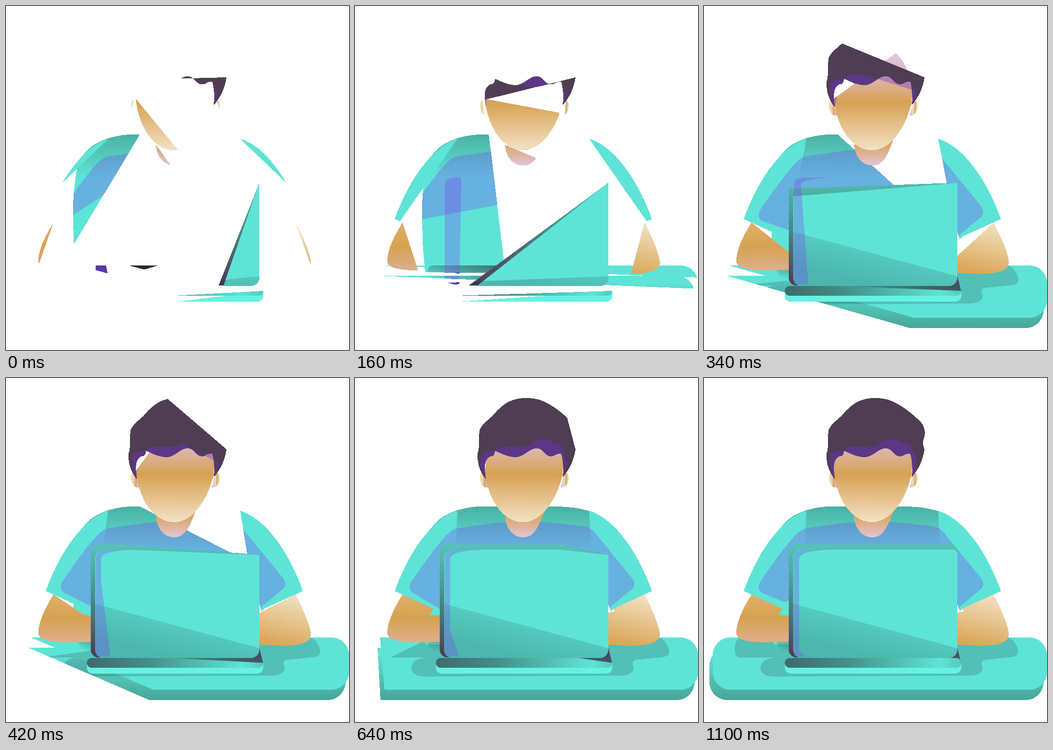
These frames come from a looping animation (700 px wide and 704 px high, 1600 ms). An HTML page with a canvas:

```html
<!DOCTYPE html>
<html>
<head>
<meta charset="utf-8">
<style>
html, body { margin: 0; width: 100%; height: 100%; overflow: hidden; background: #fff; }
canvas { display: block; }
</style>
</head>
<body>
<canvas id="stage" width="700" height="704"></canvas>
<script>
const W = 700, H = 704, LOOP = 1600, DONE = 1100, STEP = 20;
const ctx = document.getElementById('stage').getContext('2d', { willReadFrequently: true });

const TEAL = '#5ee4d6';
const VIOLET = 'rgba(117,82,238,.35)';
const FRINGE = 'rgba(112,46,212,.38)';

// Linear gradient from (x0,y0) to (x1,y1); stops alternate offset and colour
function grad(x0, y0, x1, y1, ...stops) {
  const g = ctx.createLinearGradient(x0, y0, x1, y1);
  for (let i = 0; i < stops.length; i += 2) g.addColorStop(stops[i], stops[i + 1]);
  return g;
}

// Reflects a path so that x becomes sum - x
const mirror = (d, sum) => d.replace(/(\d+) (\d+)/g, (m, x, y) => `${sum - x} ${y}`);

// Samples a path into evenly spaced points
function shape(d, fill) {
  const el = document.createElementNS('http://www.w3.org/2000/svg', 'path');
  el.setAttribute('d', d);
  const len = el.getTotalLength(), n = Math.ceil(len / 1.5), pts = [];
  for (let i = 0; i <= n; i++) pts.push(el.getPointAtLength(len * i / n));
  return { pts, fill };
}

const sleeve = 'M209 272 C180 280 148 308 118 357 C103 382 90 411 81 436 L160 472 L165 478 L205 345 Z';
const ear = 'M261 193 C256 195 254 200 255 208 C257 216 260 222 266 224 L271 224 C268 212 266 202 265 193 Z';

const shapes = [
  // table
  shape('M46 552 L656 552 A37 37 0 0 1 693 589 L693 622 A37 37 0 0 1 656 659 L48 659 A37 37 0 0 1 11 622 L11 589 A37 37 0 0 1 46 552',
    grad(0, 565, 0, 659, 0, TEAL, 1, '#47a598')),
  shape('M51 531 L664 531 A36 36 0 0 1 700 567 L700 602 A36 36 0 0 1 664 638 L54 638 A36 36 0 0 1 18 602 L18 567 A36 36 0 0 1 51 531', TEAL),
  shape('M72 572 L148 572 C125 573 115 583 115 593 C116 606 127 611 145 611 L545 609 C562 608 571 600 568 590 C563 580 570 576 582 576 L620 572 C640 571 644 565 640 554 C636 541 630 533 617 531 L73 531 C63 538 63 549 63 556 C63 566 66 571 72 572',
    'rgba(40,40,60,.2)'),

  // torso and laptop base
  shape('M273 263 C245 262 222 266 205 272 C180 281 160 295 149 320 C139 350 137 400 137 430 L138 486 L143 545 L517 548 L515 465 L490 290 L480 273 C455 265 430 263 400 263 Z',
    grad(0, 263, 0, 350, 0, '#4bb0a4', 1, TEAL)),
  shape('M170 575 L163 572 L148 541 Q150 531 160 531 L512 531 L525 585 L180 583 Z',
    grad(165, 560, 191, 463, 0, 'rgba(0,0,0,0)', 1, '#54405c')),

  // arms
  shape('M97 443 C80 470 66 500 66 522 C66 536 90 541 130 541 L173 540 L173 486 L152 485 L160 472 Z',
    grad(0, 443, 0, 541, 0, '#dfb06a', .5, '#d7a152', 1, '#dcb08c')),
  shape('M591 443 C605 470 622 508 622 525 C622 543 595 548 562 548 L517 546 L517 480 L531 477 L526 472 Z',
    grad(590, 443, 565, 548, 0, '#f2e2c3', 1, '#daa758')),
  shape(sleeve, TEAL),
  shape(mirror(sleeve, 687), TEAL),
  shape('M119 440 C111 436 110 426 114 418 C140 380 165 345 186 322 C195 313 203 308 212 307 L290 296 C325 293 365 293 400 296 L465 303 C476 304 483 309 490 317 L565 409 C572 418 571 428 564 433 L522 468 L470 555 L230 555 L180 445 Q173 460 160 457 Z', VIOLET),

  // head
  shape('M306 284 C308 305 320 326 343 326 C366 326 372 305 380 290 L386 275 Z',
    grad(0, 284, 0, 326, 0, '#d9a765', 1, '#e3c3d6')),
  shape(ear, grad(255, 0, 271, 0, 0, '#f1dfbe', .35, '#ecd3a6', .65, '#d9a04f', .85, '#dcc4ee', 1, '#b98af0')),
  shape(mirror(ear, 691), grad(436, 0, 420, 0, 0, '#f1dfbe', .35, '#d9a862', .55, '#f0dcb8', .85, '#dcc4ee', 1, '#b98af0')),
  shape('M265 190 C270 245 300 295 343 295 C385 295 415 240 424 195 C428 150 410 112 390 95 C355 74 290 78 275 127 C266 150 265 170 265 190',
    grad(0, 95, 0, 295, 0, '#dfc8ec', .27, '#dcb5a8', .51, '#d7a152', 1, '#f3e2c6')),
  shape('M450 146 C447 168 437 188 424 203 C426 185 425 170 421 155 C408 154 408 162 397 160 C386 157 384 145 372 144 C355 143 345 163 325 162 C308 160 300 155 286 149 C284 155 285 160 277 160 C267 164 264 176 265 190 L267 207 C256 194 249 175 250 155 C255 140 252 125 254 108 C258 95 270 88 281 77 C305 48 325 41 350 41 C358 41 366 42 374 44 C395 50 415 65 435 83 C450 95 452 108 450 120 C446 130 446 136 450 146',
    '#4f3d54'),
  shape('M433 174 C431 185 428 194 424 201 C426 185 425 170 421 155 C408 154 408 162 397 160 C386 157 384 145 372 144 C355 143 345 163 325 162 C308 160 300 155 286 149 C290 141 303 139 318 140 C335 143 350 142 362 132 C375 123 390 122 405 133 C415 133 422 133 424 146 C430 155 433 165 433 174',
    FRINGE),
  shape('M267 207 C258 195 255 170 258 160 C262 150 272 148 286 149 C284 155 285 160 277 160 C267 164 264 176 265 190 Z', FRINGE),

  // laptop lid
  shape('M517 362 L517 556 A16 16 0 0 1 501 572 L189 572 A16 16 0 0 1 173 556 L173 357 A16 16 0 0 1 189 341 L503 341 A14 14 0 0 1 517 355 Z',
    grad(0, 341, 0, 572, 0, '#55c4b6', .45, '#47908a', 1, '#4d3a55')),
  shape('M517 362 L517 556 A17 17 0 0 1 500 573 L199 573 A17 17 0 0 1 182 556 L182 368 A17 17 0 0 1 199 351 L507 351 A10 10 0 0 1 517 362', TEAL),
  shape('M517 553 L517 556 A17 17 0 0 1 500 573 L199 573 A17 17 0 0 1 182 556 L182 462 Z',
    grad(365, 490, 345, 573, 0, 'rgba(20,30,40,.1)', 1, 'rgba(20,30,40,.23)')),
  shape('M213 570 L183 570 L183 370 C183 357 190 351 203 351 L277 351 C250 351 225 353 208 358 C198 361 194 366 194 374 L194 550 C194 563 202 567 213 570', VIOLET),

  // laptop front edge
  shape('M525 584 L525 593 A12 12 0 0 1 513 605 L177 605 A12 12 0 0 1 165 593 L165 584 Z', '#66f2e2'),
  shape('M525 583 A10 10 0 0 1 515 593 L175 593 A10 10 0 0 1 165 583 A10 10 0 0 1 175 573 L515 573 A10 10 0 0 1 525 583',
    grad(165, 0, 525, 0, 0, '#40696a', .35, '#438f88', .88, TEAL, 1, '#55cabd'))
];

// Symmetric cubic-bezier easing that is already under way when the loop starts
function progress(t) {
  if (t >= DONE) return 1;
  const a = .565, x = .5 + (t - 212) / 1800;
  let lo = 0, hi = 1;
  for (let i = 0; i < 30; i++) {
    const s = (lo + hi) / 2, r = 1 - s;
    if (3 * a * s * r * r + 3 * (1 - a) * s * s * r + s * s * s < x) lo = s; else hi = s;
  }
  return lo * lo * (3 - 2 * lo);
}

// Fills the area between the first part of an outline and its chord
function fillPart({ pts, fill }, p) {
  const end = p * (pts.length - 1), n = Math.floor(end);
  ctx.beginPath();
  for (let i = 0; i <= n; i++) ctx.lineTo(pts[i].x, pts[i].y);
  if (n < pts.length - 1) {
    const a = pts[n], b = pts[n + 1], f = end - n;
    ctx.lineTo(a.x + (b.x - a.x) * f, a.y + (b.y - a.y) * f);
  }
  ctx.fillStyle = fill;
  ctx.fill();
}

// Makes every pixel either solid or empty
function hardenAlpha() {
  const img = ctx.getImageData(0, 0, W, H), px = img.data;
  for (let i = 3; i < px.length; i += 4) px[i] = px[i] < 128 ? 0 : 255;
  ctx.putImageData(img, 0, 0);
}

let start, shown;
function tick(now) {
  start ??= now;
  const t = Math.min(DONE, Math.floor((now - start) % LOOP / STEP) * STEP);
  if (t !== shown) {
    shown = t;
    const p = progress(t);
    ctx.clearRect(0, 0, W, H);
    for (const s of shapes) fillPart(s, p);
    hardenAlpha();
  }
  requestAnimationFrame(tick);
}
requestAnimationFrame(tick);
</script>
</body>
</html>
```
